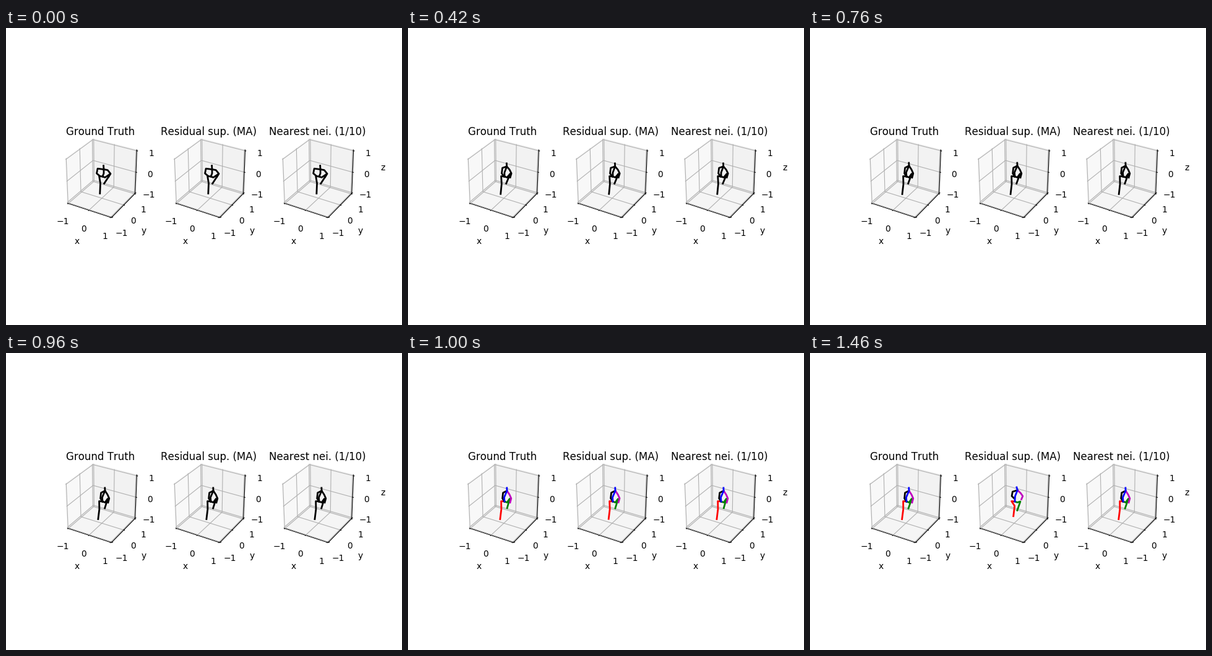
Write a matplotlib script that moves like this. It is 640 px wide and 480 px high and loops after 1480 ms.

```python
import numpy as np
import matplotlib.pyplot as plt
from matplotlib.animation import FuncAnimation
from matplotlib.patches import Polygon

W, H, DPI = 640, 480, 100
FRAMES, INTERVAL = 74, 20
SWITCH = 49                      # prediction starts here, with one grey flash
TURN = 29                        # the body has turned sideways by then

plt.rcParams["font.family"] = "DejaVu Sans"
plt.rcParams["text.kerning_factor"] = 6

# Panel layout: three square axes side by side
SIDE = W * 0.775 / 3.4
STEP = SIDE * 1.2
SCALE = SIDE / 0.185
CX = W * 0.125 + 0.095 * SCALE
CY = 242.4 + SIDE / 2 - 0.095 * SCALE

HALF = 1 + 1 / 24                # half size of the box in data units
TICK_PAD, LABEL_PAD = 0.438, 0.952
TITLES = ["Ground Truth", "Residual sup. (MA)", "Nearest nei. (1/10)"]

# Walls: low x, high y, low z
PANE_COLORS = [(v, v, v, 0.5) for v in (0.95, 0.9, 0.925)]
GREY_PANES = ["#c5c5c5", "#c2c2c2", "#c4c4c4"]
GRID, GREY_GRID = "#b0b0b0", "#8c8c8c"

# Right leg, left leg, right arm, left arm, spine
LIMB_COLORS = ["r", "g", "k", "m", "b"]
GREY_LIMBS = ["#262626", "#484848", "#000000", "#7c7c7c", "#666666"]

# Shoulder, elbow and wrist relative to the neck, side-on
RIGHT_ARM = np.array([(-6.4, 3.2), (-7.4, 12.3), (-4, 17.5)])
LEFT_ARM = np.array([(4, 6), (6.8, 12.3), (5, 19)])


def project(points, panel):
    """Perspective view (elevation 30, azimuth -60) to stage pixels."""
    p = np.atleast_2d(points) / 2
    az, el = np.radians(-60), np.radians(30)
    eye = np.array([np.cos(el) * np.cos(az), np.cos(el) * np.sin(az), np.sin(el)])
    right = np.array([-np.sin(az), np.cos(az), 0])
    up = np.cross(eye, right)
    depth = 10 - p @ eye
    x = CX + panel * STEP + SCALE * (p @ right) / depth
    y = CY - SCALE * (p @ up) / depth
    return np.column_stack([x, y])


def smooth(u):
    u = np.clip(u, 0, 1)
    return u * u * (3 - 2 * u)


def mix(a, b, u):
    return np.array(a) * (1 - u) + np.array(b) * u


def pose(t, drift=0):
    """Limbs in pixels of the first panel; drift bends them towards the residual model."""
    turn = smooth(t / TURN)
    settle = np.exp(-t / 20)
    kick = np.exp(-((t - 59) / 9) ** 2)

    hip = np.array((156, 240))
    neck = mix((158, 228.5), (160, 222.7), turn) + (0.3 * drift, -drift)
    spine = hip + mix((2, -5), (-0.6, -6.5), turn) + (drift, -2 * drift)
    head = neck + mix((-0.4, -6), (-0.2, -4.7), turn) + (-1.2 * drift, 0)

    right_knee = np.array((150.7 + 1.8 * settle, 252.5 - 1.5 * settle)) + (4.8 * drift, -5.3 * drift)
    right_foot = np.array((148.6 + 3.2 * settle, 268.6 - 1.2 * settle)) + (4.8 * drift, -4.8 * drift)
    left_knee = mix((169, 235.5), (164.4, 235.5), turn) + (0.5 * drift, 4.5 * drift)
    left_foot = np.array((158.7 + 4.1 * kick, 251.3 - 1.7 * kick + 3.5 * drift))

    # facing the viewer the arms spread wider and sit higher
    spread = mix((1.55, 0.85), (1, 1), turn) + (0.25 * drift, -0.22 * drift)
    lift = np.array((0, -4 * (1 - turn)))
    right_arm = neck + RIGHT_ARM * spread + lift
    left_arm = neck + LEFT_ARM * spread + lift

    return [np.array(limb) for limb in (
        [hip, (150.6, 239.5), right_knee, right_foot],
        [hip, (160, 241.5), left_knee, left_foot],
        [neck, *right_arm],
        [neck, *left_arm],
        [hip, spine, neck, head],
    )]


fig = plt.figure(figsize=(W / DPI, H / DPI), dpi=DPI, facecolor="white")
ax = fig.add_axes([0, 0, 1, 1])
ax.set_xlim(0, W)
ax.set_ylim(H, 0)
ax.axis("off")

panes, grid, bodies = [], [], []


def path(points, panel, **style):
    x, y = project(points, panel).T
    return ax.plot(x, y, **style)[0]


def label(text, point, panel, va):
    x, y = project(point, panel)[0]
    ax.text(x, y, text, size=10, ha="center", va=va)


def draw_axis(axis, panel):
    back = np.array([-HALF, HALF, -HALF])       # corner where the three walls meet
    edge = np.array([(0, -HALF, -HALF), (HALF, 0, -HALF), (HALF, HALF, 0)][axis])
    tick = np.eye(3)[0] if axis else -np.eye(3)[1]

    def at(spot, value):
        spot = np.array(spot, float)
        spot[axis] = value
        return spot

    def beyond(pad, value):
        return at(edge + np.sign(edge) * pad, value)

    path([at(edge, -HALF), at(edge, HALF)], panel, color="k", lw=0.8)
    first, last = [i for i in range(3) if i != axis]
    for t in (-1, 0, 1):
        ends = [back * np.where(np.arange(3) == i, -1, 1) for i in (first, last)]
        grid.append(path([at(p, t) for p in (ends[0], back, ends[1])], panel, color=GRID,
                         lw=0.8, solid_capstyle="butt", solid_joinstyle="miter"))
    for t in (-1, 0, 1):
        spot = at(edge, t)
        path([spot - tick / 60, spot + tick / 30], panel, color="k", lw=0.8)
        label(str(t).replace("-", "\u2212"), beyond(TICK_PAD, t), panel, "top")
    if axis < 2 or panel == 2:   # the other z labels lie under the next panel
        label("xyz"[axis], beyond(LABEL_PAD, 0), panel, "center")


def draw_panel(panel):
    square = HALF * np.array([(-1, -1), (1, -1), (1, 1), (-1, 1)])
    for axis, level in enumerate((-HALF, HALF, -HALF)):
        corners = np.insert(square, axis, level, axis=1)
        pane = Polygon(project(corners, panel), lw=1)
        panes.append((ax.add_patch(pane), axis))
    for axis in range(3):
        draw_axis(axis, panel)
    ax.text(W * 0.125 + SIDE / 2 + panel * STEP, 172.83, TITLES[panel],
            size=12, ha="center", va="baseline")
    bodies.append([ax.plot([], [], lw=2)[0] for _ in LIMB_COLORS])


for n in range(3):
    draw_panel(n)


def update(t):
    flash = t == SWITCH
    fig.set_facecolor("#c6c6c6" if flash else "white")
    for pane, axis in panes:
        pane.set_color((GREY_PANES if flash else PANE_COLORS)[axis])
    for line in grid:
        line.set_color(GREY_GRID if flash else GRID)

    colors = GREY_LIMBS if flash else LIMB_COLORS if t > SWITCH else ["k"] * 5
    drift = np.sin(np.pi / 2 * max(0, t - SWITCH) / (FRAMES - 1 - SWITCH))
    known = pose(t)
    residual = pose(min(t, SWITCH), drift)
    for n, (lines, limbs) in enumerate(zip(bodies, (known, residual, known))):
        for line, limb, color in zip(lines, limbs, colors):
            line.set_data(limb[:, 0] + n * STEP, limb[:, 1])
            line.set_color(color)
    return []


anim = FuncAnimation(fig, update, frames=FRAMES, interval=INTERVAL,
                     repeat=True, repeat_delay=0, blit=False)
plt.show()
```
